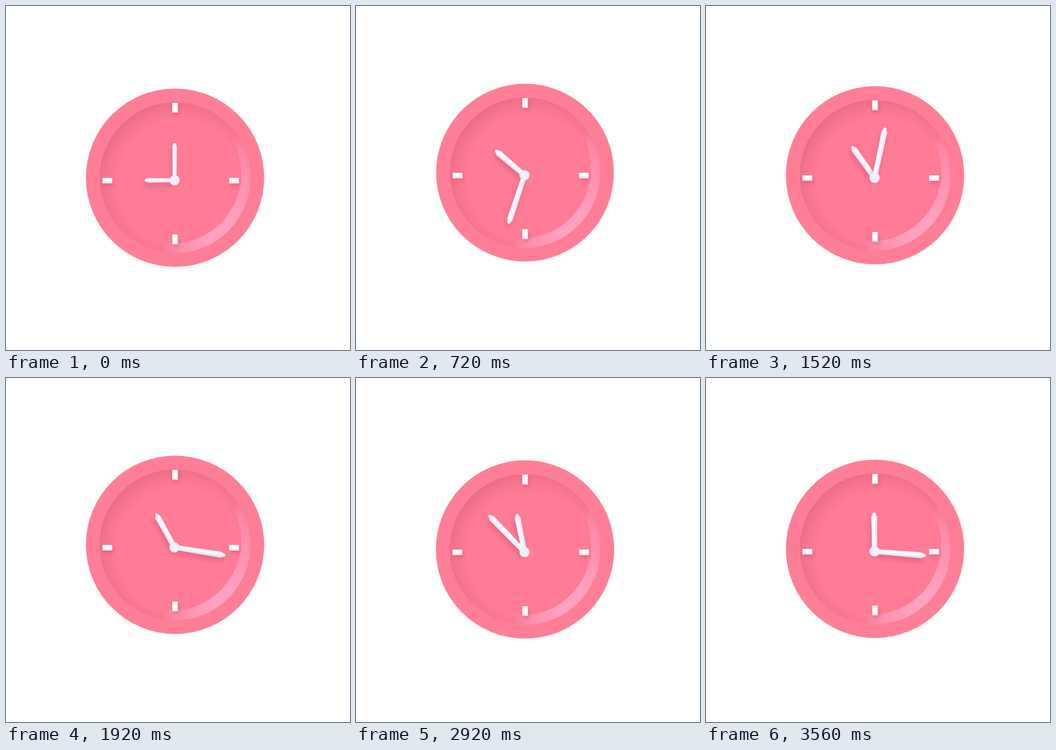
An HTML page with a canvas for the animation above (3.6 s loop, 600 px wide and 600 px high).

```html
<!DOCTYPE html>
<html lang="en">
<head>
<meta charset="utf-8">
<title>Clock</title>
<style>
  html, body { margin: 0; width: 100%; height: 100%; overflow: hidden; background: #fff; }
  canvas { display: block; width: 600px; height: 600px; }
</style>
</head>
<body>
<canvas id="stage" width="600" height="600"></canvas>
<script>
const ctx = document.getElementById('stage').getContext('2d');
const LOOP = 3600, STEP = 40, TAU = Math.PI * 2;
const ZOOM = [[0, 1], [380, 1.135], [610, 1], [900, 0.99], [1120, 0.993], [1500, 1]];
const LIFT = [[0, 299.5], [320, 299.3], [1006, 285.5]];
const BOB = { start: 1006, period: 752, top: 285.5, depth: 13.8 };

const ease = u => (1 - Math.cos(Math.PI * Math.min(1, Math.max(0, u)))) / 2;
const mix = (a, b, u) => a + (b - a) * u;

function track(keys, t) {
  for (let i = 1; i < keys.length; i++) {
    const [t0, a] = keys[i - 1], [t1, b] = keys[i];
    if (t < t1) return mix(a, b, ease((t - t0) / (t1 - t0)));
  }
  return keys[keys.length - 1][1];
}

function centerY(t) {
  if (t < BOB.start) return track(LIFT, t);
  const phase = (t - BOB.start) / BOB.period * TAU;
  return BOB.top + BOB.depth * (1 - Math.cos(phase)) / 2;
}

function shadow(color, blur, x, y) {
  ctx.shadowColor = color;
  ctx.shadowBlur = blur;
  ctx.shadowOffsetX = x;
  ctx.shadowOffsetY = y;
}

function disc(x, y, r, fill) {
  ctx.beginPath();
  ctx.arc(x, y, r, 0, TAU);
  ctx.fillStyle = fill;
  ctx.fill();
}

function poly(points, fill) {
  ctx.beginPath();
  points.forEach(([x, y]) => ctx.lineTo(x, y));
  ctx.closePath();
  ctx.fillStyle = fill;
  ctx.fill();
}

// Dish geometry is relative to the center of the rim.
const hollow = ctx.createRadialGradient(10, 10, 0, 10, 10, 148);
hollow.addColorStop(0, '#ff7c97');
hollow.addColorStop(0.74, '#ff7b96');
hollow.addColorStop(0.86, '#f8768f');
hollow.addColorStop(1, '#e66c85');

const glow = ctx.createConicGradient(-0.58, 0, 0);
[[0, 0], [0.03, 0.3], [0.1, 0.45], [0.2, 0.75], [0.26, 0.75], [0.34, 0.35], [0.37, 0], [1, 0]]
  .forEach(([at, alpha]) => glow.addColorStop(at, `rgba(255,174,206,${alpha})`));

function drawDish() {
  disc(0, 0, 155.5, '#ff7e97');
  disc(0, 0, 131.5, hollow);
  ctx.beginPath();
  ctx.arc(0, 0, 131.5, 0, TAU);
  ctx.moveTo(115.5, -7);
  ctx.arc(-6.5, -7, 122, 0, TAU);
  ctx.fillStyle = glow;
  ctx.fill('evenodd');
}

function drawMark(x, y, w, h) {
  ctx.save();
  shadow('rgba(205,70,105,.5)', 7, 2, 4);
  ctx.fillStyle = '#fff';
  ctx.fillRect(x - w / 2, y - h / 2, w, h);
  ctx.restore();
  ctx.fillStyle = '#e6e6f1';
  if (w > h) ctx.fillRect(x - w / 2, y + h / 2 - 3, w, 3);
  else {
    ctx.fillRect(x + w / 2 - 2, y - h / 2, 2, h);
    ctx.fillRect(x - w / 2, y + h / 2 - 2, w, 2);
  }
}

function drawHand(angle, length, size) {
  const base = 4.2 * size, head = 5 * size, neck = length - 8 * size;
  ctx.save();
  ctx.rotate(angle * Math.PI / 180);
  ctx.save();
  shadow('rgba(190,75,115,.42)', 9, -2, 7);
  poly([[-base, 0], [-head, -neck], [-1.5, -length], [1.5, -length], [head, -neck], [base, 0]], '#f8f8fd');
  ctx.restore();
  // The side facing away from the light is a shade darker.
  const side = Math.sin((angle + 20) * Math.PI / 180) >= 0 ? 1 : -1;
  poly([[side * base * 0.3, 0], [side * head * 0.3, -neck], [side * 1.5, -length],
    [side * head, -neck], [side * base, 0]], '#e5e8f6');
  ctx.restore();
}

function draw(t) {
  const zoom = track(ZOOM, t);
  const grow = ease(t / 380), lag = 1 - ease(t / 400);
  ctx.fillStyle = '#fff';
  ctx.fillRect(0, 0, 600, 600);
  ctx.save();
  ctx.translate(294.8, centerY(t));
  ctx.scale(zoom, zoom);
  drawDish();
  drawMark(0.2, -122, 10, 17);
  drawMark(0.2, 107.5, 10, 17);
  drawMark(-118, 5, 17, 9.5);
  drawMark(103, 5, 17, 9.5);

  ctx.translate(-0.8, 4.5);
  const size = mix(0.76, 1, grow);
  drawHand(298.1 + 0.0172 * t - 28.1 * lag, mix(52, 67.5, grow), size);
  drawHand(42.2 + 0.217 * t - 42.2 * lag, mix(65, 89.5, grow), size);
  disc(0, 0, 9, '#eaecf8');
  disc(-0.5, -0.8, 7.5, '#f0f1fa');
  ctx.restore();
}

function frame(now) {
  draw(Math.floor(now % LOOP / STEP) * STEP);
  requestAnimationFrame(frame);
}
draw(0);
requestAnimationFrame(frame);
</script>
</body>
</html>
```
